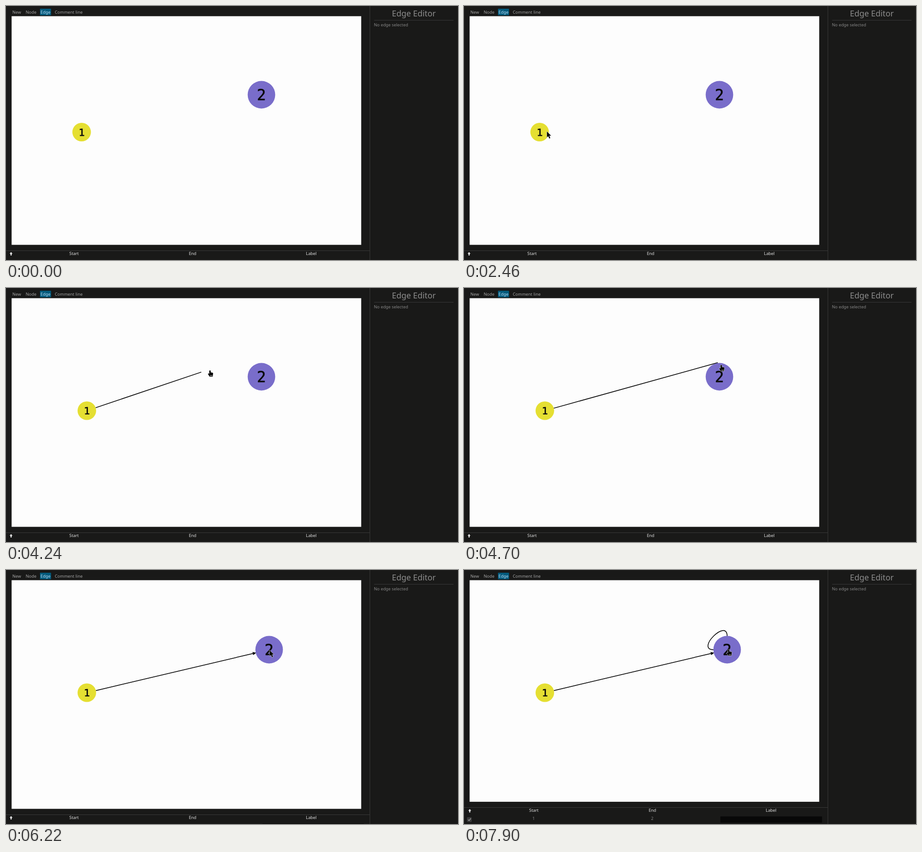
An HTML page that plays this animation: 998 px wide and 561 px high, repeating every 8000 ms.

```html
<!DOCTYPE html>
<html lang="en">
<head>
<meta charset="utf-8">
<title>Edge editor</title>
<style>
html, body { margin: 0; width: 100%; height: 100%; overflow: hidden; background: #191918; }
svg { display: block; width: 100%; height: 100%; }
text { font: 9.3px "Noto Sans", "Open Sans", sans-serif; fill: #a4a4a4; }
.mid { text-anchor: middle; }
.head { fill: #e4e4e4; }
.title { font-size: 17.9px; fill: #8c8c8c; }
.dim { fill: #878787; }
.num { font-family: "DejaVu Sans Mono", monospace; fill: #0a0a0a; stroke: #0a0a0a; stroke-width: .7; text-anchor: middle; }
.rule { stroke: #3a3a3a; }
.edge { stroke: #0c0c0c; stroke-width: 1.7; fill: none; }
.cursor { fill: #0a0a0a; stroke: #fff; paint-order: stroke; }
</style>
</head>
<body>
<svg viewBox="0 0 998 561">
  <rect width="998" height="561" fill="#191918"/>
  <rect id="canvas" x="12.4" y="22.5" width="771.9" height="505" fill="#fdfdfd"/>

  <rect x="75" y="6" width="24.5" height="14.5" rx="1" fill="#025a7c"/>
  <text x="14" y="16.5">New</text>
  <text x="43.5" y="16.5">Node</text>
  <text x="87.3" y="16.5" class="mid" style="fill:#bcdcf5">Edge</text>
  <text x="107.7" y="16.5">Comment line</text>

  <path class="rule" d="M803.5 0V561M813 31.5H988"/>
  <text x="900.5" y="22.7" class="mid title">Edge Editor</text>
  <text x="812.3" y="44.7" class="dim">No edge selected</text>

  <path id="split" class="rule" d="M0 540.5H803"/>
  <path id="sort" d="M11.2 543.5L14.5 547.3H12.4V551H10V547.3H7.9Z" fill="#f0f0f0"/>
  <g id="header">
    <text x="150.3" y="550" class="mid head">Start</text>
    <text x="412" y="550" class="mid head">End</text>
    <text x="674" y="550" class="mid head">Label</text>
  </g>
  <g id="row">
    <rect x="6.5" y="546" width="10.5" height="10.5" rx="1.5" fill="#3a3a3a"/>
    <path d="M9 551.3L11.2 553.6L15 548.6" fill="none" stroke="#b0b0b0" stroke-width="1.2"/>
    <text x="153.7" y="552.3" class="mid dim">1</text>
    <text x="415.7" y="552.3" class="mid dim">2</text>
    <rect x="566" y="544.3" width="224.5" height="14" rx="1" fill="#080808"/>
  </g>

  <path id="line" class="edge"/>
  <path id="tip" d="M0 0L-8 -3.7V3.7Z" fill="#0c0c0c"/>
  <path id="loop" class="edge" d="M551 176C511 176 581 106 581 146"/>

  <g id="node1"><circle r="20.5" fill="#e5df32"/><text class="num" y="8" style="font-size:22px">1</text></g>
  <g id="node2"><circle r="30.4" fill="#796dca"/><text class="num" y="11.8" style="font-size:33px">2</text></g>

  <path id="arrow" class="cursor" d="M0 0V13.2L3 10.5L5.2 15.8L7.6 14.8L5.4 9.6H9.4Z"/>
  <g id="hand">
    <path class="cursor" d="M-1.6 1.2Q-1.6 0 0 0T1.6 1.2V4.4L6.2 5.2Q7 5.6 6.9 7L6 13.8H-1L-4.3 8.4Q-4.5 6.4 -3 6.6L-1.6 7.6Z"/>
    <path d="M0 11.6H5.2" stroke="#fff" stroke-width=".8"/>
  </g>
</svg>
<script>
const LOOP = 8000;
const ENTER = 500, GRAB1 = 2980, DROP1 = 3500, PULL = 3840, LINK = 5500,
      GRAB2 = 5820, DROP2 = 6160, OPEN = 6420, HAND2 = 7740, SELF = 7820;
const R1 = 20.4, R2 = 29, LAG = 40;

// places where the pointer turns: time, x, y
const turns = [
  [ENTER, 92, 6], [840, 606, 358], [1060, 344.5, 255], [1300, 282, 246],
  [2000, 184, 280], [2460, 183, 277], [GRAB1, 175, 279], [3200, 162, 281],
  [DROP1, 178.5, 271], [PULL, 186, 252], [4240, 450, 182], [4660, 560, 164.8],
  [4700, 568, 170], [LINK, 583, 195], [5660, 565, 197], [GRAB2, 565, 197],
  [DROP2, 582, 177], [7360, 582, 177], [7500, 584.5, 175.5], [LOOP, 584.5, 175.5]
];

const el = {};
for (const e of document.querySelectorAll("[id]")) el[e.id] = e;

const slope = (i, k) => (turns[i + 1][k] - turns[i][k]) / (turns[i + 1][0] - turns[i][0]);

// harmonic mean keeps the curve from overshooting
function tangent(i, k) {
  if (i === 0 || i === turns.length - 1) return 0;
  const a = slope(i - 1, k), b = slope(i, k);
  return a * b > 0 ? 2 * a * b / (a + b) : 0;
}

function pointer(t) {
  t = Math.max(t, ENTER);
  let i = 0;
  while (i < turns.length - 2 && turns[i + 1][0] <= t) i++;
  const from = turns[i], to = turns[i + 1];
  const span = to[0] - from[0], u = (t - from[0]) / span, v = 1 - u;
  return [1, 2].map(k =>
    from[k] * v * v * (1 + 2 * u) + to[k] * u * u * (3 - 2 * u) +
    span * u * v * (v * tangent(i, k) - u * tangent(i + 1, k)));
}

const show = (e, on) => e.setAttribute("visibility", on ? "visible" : "hidden");
const move = (e, [x, y], angle = 0) => e.setAttribute("transform", `translate(${x} ${y}) rotate(${angle})`);

function node1(t) {
  return t < GRAB1 ? [167, 278.5] : pointer(Math.min(t, DROP1));
}

function node2(t) {
  const [x, y] = pointer(Math.min(Math.max(t, GRAB2), DROP2));
  return [x - 1, y - 1];
}

function drawEdge(t, a, b) {
  const linked = t >= LINK;
  const end = linked ? b : pointer(Math.max(t - LAG, PULL));
  const angle = Math.atan2(end[1] - a[1], end[0] - a[0]);
  const at = (p, d) => [p[0] + Math.cos(angle) * d, p[1] + Math.sin(angle) * d];
  const stop = linked ? at(b, -R2 - 4) : end;
  el.line.setAttribute("d", `M${at(a, R1)}L${stop}`);
  move(el.tip, at(b, -R2), angle * 180 / Math.PI);
  show(el.line, t >= PULL);
  show(el.tip, linked);
}

function drawTable(t) {
  const open = t >= OPEN, rise = open ? -15.6 : 0;
  el.canvas.setAttribute("height", 505 + rise);
  move(el.split, [0, open ? -16 : 0]);
  move(el.sort, [open ? 1.5 : 0, rise]);
  move(el.header, [open ? 4 : 0, rise]);
  move(el.row, [0, open ? 0 : 15.7]);
  show(el.row, t >= GRAB2);
}

function draw(t) {
  const a = node1(t), b = node2(t);
  move(el.node1, a);
  move(el.node2, b);
  drawEdge(t, a, b);
  drawTable(t);
  show(el.loop, t >= SELF);

  const hand = (t >= PULL && t < LINK) || t >= HAND2;
  show(el.hand, hand);
  show(el.arrow, t >= ENTER && !hand);
  move(hand ? el.hand : el.arrow, pointer(t));
}

const start = performance.now();
function tick() {
  draw((performance.now() - start) % LOOP);
  requestAnimationFrame(tick);
}
tick();
</script>
</body>
</html>
```
